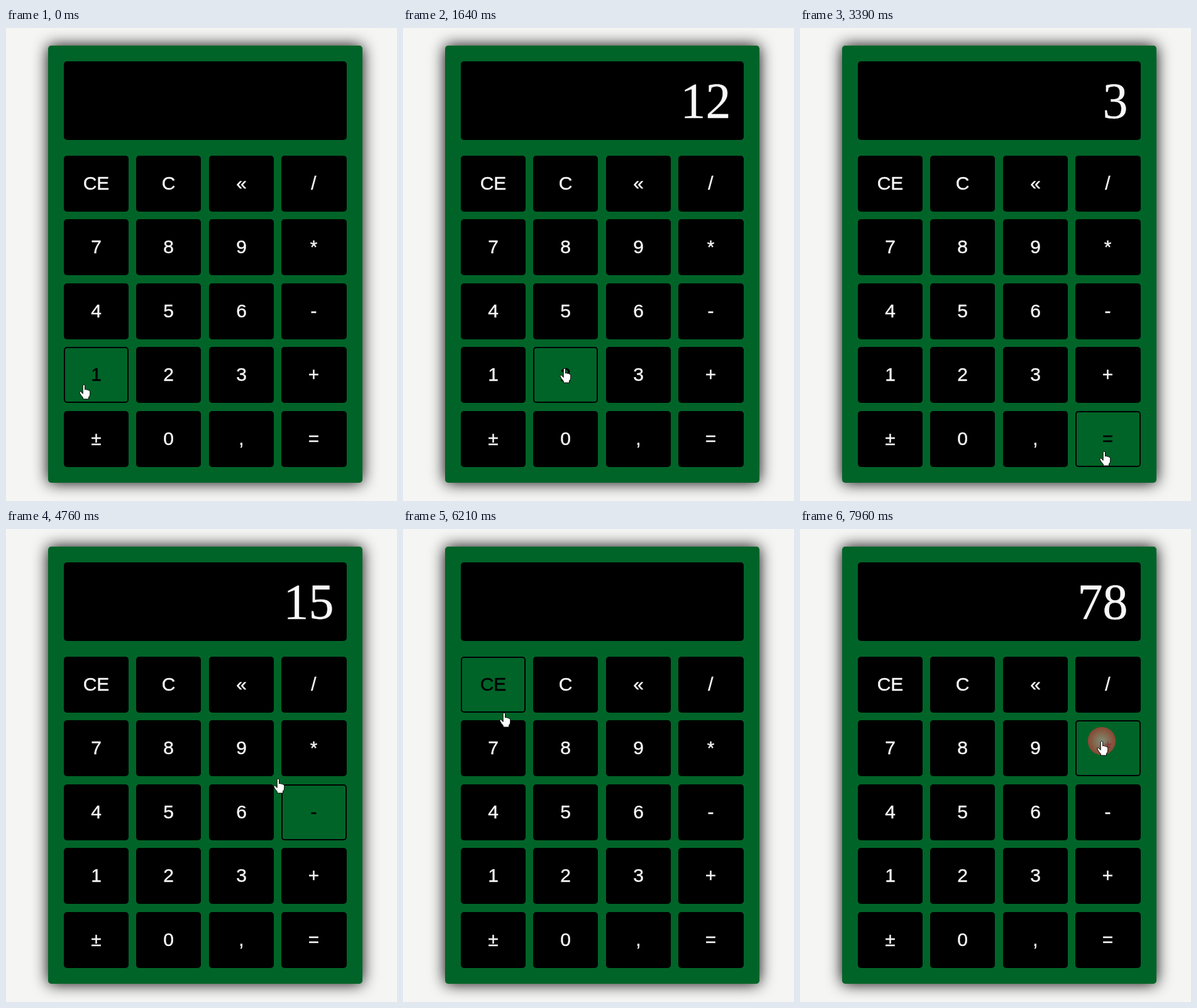
Recreate the animation shown at these times as an HTML page. Size 622 by 752 pixels, loop 8000 ms.

```html
<!DOCTYPE html>
<html lang="en">
<head>
<meta charset="utf-8">
<title>Calculator</title>
<style>
  html, body { margin: 0; width: 100%; height: 100%; overflow: hidden; background: #f5f5f4; }
  .card { position: absolute; left: 67px; top: 28px; width: 500px; height: 695px;
    border-radius: 5px; background: #006428; box-shadow: 0 0 25px #000; }
  svg { position: absolute; left: 0; top: 0; }
  text { fill: #f8f8f8; stroke: #f8f8f8; stroke-width: .4; }
  .key text { font: 30px Arial, "Liberation Sans", sans-serif; text-anchor: middle; }
  .key.on rect { fill: none; stroke: #000; stroke-width: 2; }
  .key.on text { fill: #000; stroke: #000; }
  #out { font: 80px "Times New Roman", "Liberation Serif", serif; text-anchor: end; }
</style>
</head>
<body>
<div class="card"></div>
<svg width="622" height="752" viewBox="0 0 622 752">
  <defs>
    <radialGradient id="glow">
      <stop offset="0" stop-color="#e0b0b0"/>
      <stop offset="1" stop-color="#f03038"/>
    </radialGradient>
  </defs>
  <rect x="92" y="53" width="450" height="125" rx="5"/>
  <text id="out" x="521.5" y="143"></text>
  <g id="keys"></g>
  <g id="ripples"></g>
  <g id="cursor" stroke="#000" stroke-linejoin="round" fill="#fff">
    <path id="hand" d="M-1.8 1.2Q0 -1.2 1.6 1.2V8Q3.2 6.3 4.6 8.4Q6.2 7 7.4 9.2Q9.6 8.4 9.8 11V15Q9.8 18 7.6 20V23H-1.6V20.6Q-5 17 -7 13Q-7.6 10.6 -5.2 10.8L-1.8 14.4Z"/>
    <path id="arrow" d="M0 0V16.5L3.8 13L6.3 18.8L8.8 17.7L6.4 12H11.7Z"/>
  </g>
</svg>
<script>
const LOOP = 8000, LAG = 40, RIPPLE = 380, REACH = 42;
const $ = id => document.getElementById(id);

function add(parent, tag, attrs) {
  const el = document.createElementNS('http://www.w3.org/2000/svg', tag);
  set(el, attrs);
  return parent.appendChild(el);
}

function set(el, attrs) {
  for (const k in attrs) el.setAttribute(k, attrs[k]);
}

// Pointer stops; a stop with a readout is a click.
const stop = (t, x, y, readout) => ({ t, x, y, readout });
const stops = [
  stop(0, 124, 567),
  stop(260, 16, 210),
  stop(560, 548, 705),
  stop(900, 124, 566, '1'),
  stop(1640, 257, 541, '12'),
  stop(1920, 432, 324),
  stop(2170, 504, 569, '12'),
  stop(3010, 360, 550, '3'),
  stop(3390, 484, 673),
  stop(3850, 485, 662, '15'),
  stop(4560, 536, 560),
  stop(4760, 434, 398),
  stop(4880, 181, 250, '15'),
  stop(5450, 181, 250, ''),
  stop(6060, 181, 250),
  stop(6420, 128, 360, '7'),
  stop(7010, 263, 331),
  stop(7340, 235, 318, '78'),
  stop(7760, 480, 337, '78'),
  stop(LOOP, 480, 337)
];
const clicks = stops.filter(s => s.readout !== undefined);

// Speed through a stop: none at clicks and turning points.
function speed(i, axis) {
  const a = stops[i - 1], b = stops[i], c = stops[i + 1];
  if (!a || !c || b.readout !== undefined) return 0;
  const u = (b[axis] - a[axis]) / (b.t - a.t), v = (c[axis] - b[axis]) / (c.t - b.t);
  return u * v > 0 ? 2 * u * v / (u + v) : 0;
}

function pointer(t) {
  const i = Math.max(1, stops.findIndex(s => s.t >= t));
  const a = stops[i - 1], b = stops[i], span = b.t - a.t;
  const p = (t - a.t) / span, q = 1 - p;
  return ['x', 'y'].map(k =>
    a[k] * q * q * (1 + 2 * p) + b[k] * p * p * (1 + 2 * q) +
    span * p * q * (speed(i - 1, k) * q - speed(i, k) * p));
}

const labels = ['CE', 'C', '«', '/', ...'789*456-123+±0,='];
const keys = labels.map((label, i) => {
  const col = i % 4, row = i >> 2;
  const x = Math.floor(92 + col * 115.5), y = Math.round(203 + row * 101.4);
  const w = col === 3 ? 104 : 103, h = 89;
  const el = add($('keys'), 'g', { class: 'key' });
  const box = add(el, 'rect', {});
  add(el, 'text', { x: x + 51.5, y: y + 54 }).textContent = label;
  return { el, box, x, y, w, h, on: null };
});

function light(key, on) {
  if (key.on === on) return;
  key.on = on;
  const d = on ? 1 : 0;
  key.el.classList.toggle('on', on);
  set(key.box, { x: key.x + d, y: key.y + d, width: key.w - 2 * d, height: key.h - 2 * d, rx: 5 - d });
}

const ripples = clicks.map(c => ({
  start: c.t,
  el: add($('ripples'), 'circle', { cx: c.x, cy: c.y, r: 0, fill: 'url(#glow)' })
}));

function draw(t) {
  const [hx, hy] = pointer(Math.max(0, t - LAG));
  for (const k of keys) {
    light(k, hx >= k.x && hx < k.x + k.w && hy >= k.y && hy < k.y + k.h);
  }
  const last = clicks.filter(c => c.t <= t).pop();
  $('out').textContent = last ? last.readout : '';

  for (const { start, el } of ripples) {
    const p = (t - start) / RIPPLE, live = p > 0 && p < 1;
    set(el, { r: live ? REACH * p : 0, opacity: live ? Math.min(0.9, 1.2 * (1 - p)) : 0 });
  }

  const [x, y] = pointer(t), over = keys.some(k => k.on);
  set($('cursor'), { transform: `translate(${Math.round(x)} ${Math.round(y)})` });
  $('hand').style.display = over ? '' : 'none';
  $('arrow').style.display = over ? 'none' : '';
}

const begin = performance.now();
function tick() {
  draw(Math.max(0, performance.now() - begin) % LOOP);
  requestAnimationFrame(tick);
}
draw(0);
requestAnimationFrame(tick);
</script>
</body>
</html>
```
